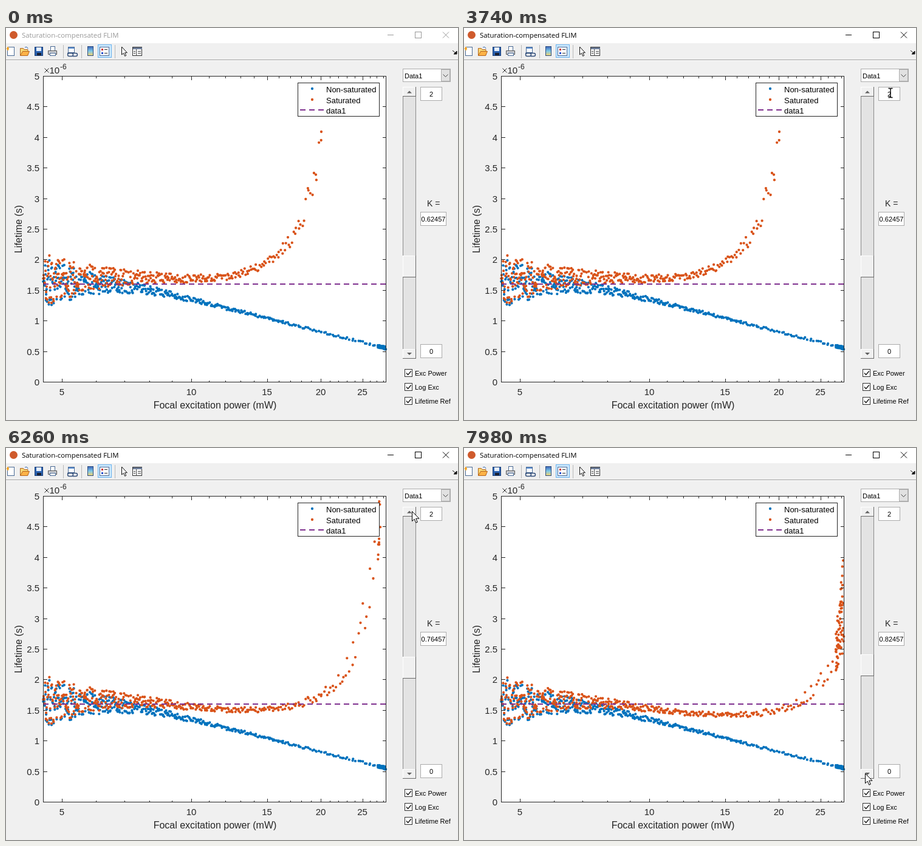
Write an HTML page that moves like this. It is 744 px wide and 646 px high and loops after 8000 ms.

```html
<!DOCTYPE html>
<html lang="en">
<head>
<meta charset="utf-8">
<title>Lifetime plot</title>
<style>
html, body { margin: 0; width: 100%; height: 100%; overflow: hidden; background: #f0f0f0; }
svg { display: block; width: 744px; height: 646px; font-family: "Liberation Sans", Arial, sans-serif; }
rect, line, .crisp { shape-rendering: crispEdges; }
text { white-space: pre; }
.ui { font-size: 11px; fill: #000; }
.axis { font-size: 15px; fill: #262626; }
.label { font-size: 16px; fill: #262626; }
.legend { font-size: 13px; fill: #000; }
.dots { fill: none; stroke-width: 4.3; stroke-linecap: round; }
.dash { stroke: #7e2f8e; stroke-width: 2; stroke-dasharray: 9 6; }
.mid { text-anchor: middle; }
.end { text-anchor: end; }
#halo { fill: #f4ea2e; fill-opacity: .8; mix-blend-mode: multiply; }
</style>
</head>
<body>
<svg id="stage" viewBox="0 0 744 646"></svg>
<script>
const BLUE = '#0072bd', ORANGE = '#d95319', INK = '#262626';
const PLOT = { left: 61.5, right: 625.5, top: 79.5, bottom: 583.5 };
const yOf = v => PLOT.bottom - 100.8 * v;

// Markup helpers
const box = (x, y, w, h, fill, stroke = 'none', extra = '') =>
  `<rect x="${x}" y="${y}" width="${w}" height="${h}" fill="${fill}" stroke="${stroke}" ${extra}/>`;
const path = (d, stroke = INK, fill = 'none', extra = '') =>
  `<path d="${d}" stroke="${stroke}" fill="${fill}" ${extra}/>`;
const crisp = (d, stroke) => path(d, stroke, 'none', 'class="crisp"');
const text = (x, y, s, cls = 'ui', extra = '') =>
  `<text x="${x}" y="${y}" class="${cls}" ${extra}>${s}</text>`;
const raised = (x, y, w, h) => box(x, y, w, h, '#f0f0f0') +
  crisp(`M${x + .5} ${y + h - 1}V${y + .5}H${x + w - 1}`, '#fff') +
  crisp(`M${x} ${y + h - .5}H${x + w - .5}V${y}`, '#696969');
const field = (x, y, w, s, id = '') => box(x + .5, y + .5, w - 1, 22, '#fff', '#ababab') +
  text(x + w / 2, y + 15.5, s, 'ui mid', id && `id="${id}"`);
const check = (y, s) => box(656.5, y + .5, 12, 12, '#fff', '#333') +
  path(`M659 ${y + 6.5}l2.7 3 5-6`, '#111', 'none', 'stroke-width="1.3"') + text(673, y + 11, s);

function randomFrom(seed) {
  return () => {
    seed = seed + 0x6d2b79f5 | 0;
    let r = Math.imul(seed ^ seed >>> 15, 1 | seed);
    r = r + Math.imul(r ^ r >>> 7, 61 | r) ^ r;
    return ((r ^ r >>> 14) >>> 0) / 4294967296;
  };
}

const range = (a, b, step) => Array.from({ length: Math.floor((b - a) / step) + 1 }, (_, i) => a + i * step);

// Model over the horizontal pixel position, which is logarithmic in power
const SPAN = 565, SWEEP = 415, PLATEAU = 70;
const endRise = x => Math.max(0, (x - 61) / SPAN) ** 30;
const meanLifetime = x => 1.62 - .0025 * 35 * Math.log1p(Math.exp((x - 199) / 35));
const saturation = x => Math.exp((x - 629) / 114 + .05 * endRise(x));
const sweepX = q => 61 - 300 * Math.log(1 - q * (1 - Math.exp(-SPAN / 300)));

const dataSets = [
  { name: 'Data1', seed: 11, shift: 0, spread: .42, decay: 90, xOf: p => 305 + 213 * Math.log2(p / 10),
    major: range(5, 25, 5), minor: range(5, 28, 1) },
  { name: 'Data2', seed: 29, shift: 16, spread: .52, decay: 68, xOf: p => 313 + 214 * Math.log2(p / 10),
    major: range(6, 26, 2), minor: range(4.5, 28, .5) }
];

for (const set of dataSets) {
  const random = randomFrom(set.seed);
  const noise = x => .015 + .01 * endRise(x) + set.spread * Math.exp((61 - x) / set.decay);
  set.samples = Array.from({ length: SWEEP + PLATEAU }, (_, i) => {
    const x = i < SWEEP ? sweepX((i + random()) / SWEEP) : 626 - 14 * random();
    return { x, v: meanLifetime(x) + noise(x) * (random() * 2 - 1) };
  });
  const tick = len => p => {
    const x = Math.round(set.xOf(p)) + .5;
    return x > 62 && x < 625 ? `M${x} ${PLOT.bottom}v${-len}M${x} ${PLOT.top}v${len}` : '';
  };
  set.ticks = set.minor.map(tick(3)).concat(set.major.map(tick(6))).join('');
  set.labels = set.major.map(p => text(set.xOf(p), 605, p, 'axis mid')).join('');
}

const dotPath = points => points.filter(p => p.v > 0 && p.v < 5.03)
  .map(p => `M${p.x.toFixed(1)} ${yOf(p.v).toFixed(1)}h0`).join('');
const compensated = (set, k) => set.samples.map(({ x, v }) =>
  ({ x, v: 1 / (1 / v - saturation(x - set.shift) / (k * k)) }));

// Static picture
const toolbar = () => {
  const sheet = (x, y, w, h) => box(x + .5, y + .5, w, h, '#fff', '#4a6a95');
  return [94.5, 124.5, 179.5].map(x => crisp(`M${x} 28V50`, '#b8b8b8')).join('') +
    sheet(2, 31, 11, 14) + path('M1 34h4M3 31v6', '#f0a020', 'none', 'stroke-width="2"') +
    path('M23.5 45V33.5h5l1.5 2h6V45Z', '#b5651d', '#f7d774') + path('M23.5 45.5l4-7h11l-3 7Z', '#b5651d', '#ffb347') +
    path('M31 32q4-2 5 2', '#2b62b0') +
    box(47.5, 31.5, 13, 14, '#2b62b0', '#1b3f78') + box(50, 32, 8, 6, '#e8f0fb') + box(51, 41, 7, 4, '#1c2333') +
    sheet(73, 30, 7, 7) + path('M69.5 37.5h14v6h-14Z', '#555', '#c9ccd2') + sheet(72, 41, 9, 4) +
    sheet(102, 31, 10, 9) + box(103, 32, 9, 2, '#5b8ed0') +
    path('M101 41.5h7a2.5 2.5 0 0 1 0 5h-4a2.5 2.5 0 0 1 0-5m5 0h6a2.5 2.5 0 0 1 0 5h-5', '#34507c', 'none', 'stroke-width="1.4"') +
    box(134.5, 30.5, 9, 15, 'url(#bar)', '#2c4d80') +
    box(151.5, 27.5, 22, 21, '#cce8ff', '#6cb4ee') + sheet(154, 31, 15, 14) +
    box(157, 34, 3, 3, '#d02020') + box(157, 40, 3, 3, '#2050d0') + crisp('M162 35.5h5M162 41.5h5', '#333') +
    path('M190.5 31v13l3-2.6 2.2 5 2-1-2.1-4.7h3.8Z', '#111', '#fff') +
    box(208.5, 31.5, 15, 14, '#fff', '#333') + box(209, 32, 15, 3, '#6c7c98') +
    crisp('M214.5 35v11M210 38.5h3M210 41.5h3M217 38.5h5M217 41.5h5', '#444') +
    path('M735 37l4 3.5M742 38v5h-5Z', '#111', '#111');
};

const yTicks = range(0, 5, .5);
const yTickMarks = yTicks.map(v => Math.round(yOf(v) - .5) + .5).map(y => `M61.5 ${y}h6M625.5 ${y}h-6`).join('');

document.getElementById('stage').innerHTML = `
<defs><linearGradient id="bar" x2="0" y2="1">
  <stop stop-color="#3a62b8"/><stop offset=".5" stop-color="#7ec8e8"/><stop offset="1" stop-color="#f6d36a"/>
</linearGradient></defs>
${box(0, 0, 744, 646, '#f0f0f0')}${box(0, 0, 744, 25, '#fff')}
<circle cx="12.5" cy="11.5" r="6.5" fill="#cf5a2c"/>
<g id="caption">${text(26, 16, 'Saturation-compensated FLIM', '', 'font-size="11.4" style="font-family:\'Open Sans\',sans-serif"')}
${crisp('M628 11.5h10M673.5 6.5h10v10h-10Z', 'currentColor')}${path('M719 6.5l10 10m0-10l-10 10', 'currentColor')}</g>
${toolbar()}
${crisp('M0 52.5H744', '#a0a0a0')}${crisp('M0 53.5H744', '#fff')}
${box(61, 79, 565, 505, '#fff')}
<path id="measured" class="dots" stroke="${BLUE}"/><path id="corrected" class="dots" stroke="${ORANGE}"/>
<line class="dash" x1="61" x2="626" y1="422" y2="422"/>
${crisp('M61.5 79.5H625.5V583.5H61.5Z' + yTickMarks, INK)}
<path id="ticks" class="crisp" stroke="${INK}"/><g id="labels"></g>
${yTicks.map(v => text(55, yOf(v) + 5.5, v, 'axis end')).join('')}
${path('M63.5 66.5l7 7m0-7l-7 7', INK)}${text(71.5, 75, '10', 'axis')}${text(89, 68, '-6', 'axis', 'style="font-size:12px"')}
${text(344, 627, 'Focal excitation power (mW)', 'label mid')}
${text(0, 0, 'Lifetime (s)', 'label mid', 'transform="translate(26 331.5) rotate(-90)"')}
${box(480.5, 90.5, 134, 55, '#fff', INK)}
<path class="dots" stroke="${BLUE}" d="M504 100h0"/><path class="dots" stroke="${ORANGE}" d="M504 118h0"/>
<line class="dash" x1="484" x2="524" y1="135" y2="135"/>
${['Non-saturated', 'Saturated', 'data1'].map((s, i) => text(527, 106 + 17.5 * i, s, 'legend')).join('')}
${box(653.5, 97.5, 21, 447, '#e3e3e3', '#8a8a8a')}
${raised(653, 97, 22, 16)}${path('M660 107.5h8l-4-4Z', 'none', '#606060')}
${raised(653, 529, 22, 16)}${path('M660 535h8l-4 4Z', 'none', '#606060')}
<g id="thumb">${raised(653, 0, 22, 36)}</g>
${field(682, 97, 36, '2')}${field(682, 521, 36, '0')}${field(682, 303, 43, '', 'kValue')}
${text(693, 294, 'K =', 'label', 'style="font-size:14px"')}
${['Exc Power', 'Log Exc', 'Lifetime Ref'].map((s, i) => check(562 + 23 * i, s)).join('')}
${box(653.5, 67.5, 78, 21, '#fff', '#adadad')}${text(656, 83, '', 'ui', 'id="choice"')}
${box(654.5, 68.5, 61, 19, 'none', '#222', 'id="focus" stroke-dasharray="1 1"')}
${box(716.5, 68.5, 14, 19, '#e1e1e1', '#adadad', 'id="drop"')}${path('M719.5 76.5l4 4 4-4', '#444')}
<g id="list">${box(653.5, 89.5, 78, 35, '#fff', '#444')}${box(654, 0, 77, 17, '#0078d7', 'none', 'id="hover"')}
${text(658, 103, 'Data1', 'ui', 'id="item0"')}${text(658, 120, 'Data2', 'ui', 'id="item1"')}</g>
<circle id="halo" r="14.5"/>
${path('M.5.5V16.6L4.2 13.2 6.8 19.2 9.3 18.1 6.7 12.2H12Z', '#000', '#fff', 'id="arrow"')}
${path('M-3.5-7.5H-1L0-6.5 1-7.5H3.5M-3.5 7.5H-1L0 6.5 1 7.5H3.5M0-6.5V6.5', '#000', 'none', 'id="beam" stroke-width="1.4"')}`;

const el = Object.fromEntries([...document.querySelectorAll('[id]')].map(e => [e.id, e]));
const show = (e, on) => e.setAttribute('visibility', on ? 'visible' : 'hidden');
const place = (e, x, y) => e.setAttribute('transform', `translate(${x.toFixed(1)} ${y.toFixed(1)})`);
const within = (t, a, b) => t >= a && t < b;

// Timeline
const LOOP = 8000, FRAME = 74, UPDATE_LAG = 130;
const moves = [ // start, end, x, y
  [150, 600, 682, 80], [900, 1180, 675, 116], [1620, 1770, 687, 86], [2380, 2500, 684, 100], [3330, 3670, 702, 107],
  [4000, 4280, 664, 105], [5800, 6080, 668, 104], [6800, 7320, 661, 563], [7400, 7540, 660, 536]];
const bursts = [[4400, 2, 240, 1], [5130, 2, 220, 1], [5800, 7, 140, 1], [7630, 2, 350, -1]];
const clicks = bursts.flatMap(([start, count, gap, dir]) =>
  Array.from({ length: count }, (_, i) => ({ at: start + i * gap, dir })));
const menuClicks = [[900, 980], [1450, 1600], [2120, 2200], [3070, 3140]];

const sliderAt = t => .62457 + clicks.reduce((sum, { at, dir }) => sum + (t >= at ? .02 * dir : 0), 0);

function pointerAt(t) {
  const held = Math.floor(t / FRAME) * FRAME;
  return moves.reduce(([x, y], [start, end, toX, toY]) => {
    const k = Math.min(1, Math.max(0, (held - start) / (end - start)));
    const ease = k * k * (3 - 2 * k);
    return [x + (toX - x) * ease, y + (toY - y) * ease];
  }, [744, 175]);
}

let drawn = '';
function drawPlot(set, k) {
  const key = set.name + k.toFixed(5);
  if (key === drawn) return;
  drawn = key;
  el.measured.setAttribute('d', dotPath(set.samples));
  el.corrected.setAttribute('d', dotPath(compensated(set, k)));
  el.ticks.setAttribute('d', set.ticks);
  el.labels.innerHTML = set.labels;
  el.kValue.textContent = k.toFixed(5);
}

function render(t) {
  drawPlot(dataSets[+within(t, 1680, 3220)], sliderAt(t - UPDATE_LAG));
  place(el.thumb, 0, Math.round(112 + 382 * (1 - sliderAt(t) / 2)));

  const caption = t < 900 ? '#999' : '#000';
  el.caption.setAttribute('fill', caption);
  el.caption.style.color = caption;

  el.choice.textContent = within(t, 1600, 3140) ? 'Data2' : 'Data1';
  show(el.focus, within(t, 980, 3670));
  const hot = within(t, 600, 1750) || within(t, 1980, 3290);
  el.drop.setAttribute('fill', hot ? '#cce4f7' : '#e1e1e1');
  el.drop.setAttribute('stroke', hot ? '#5a9bd0' : '#adadad');

  const open = within(t, 980, 1600) || within(t, 2200, 3140);
  const second = within(t, 1120, 2440);
  show(el.list, open);
  el.hover.setAttribute('y', second ? 107 : 90);
  el.item0.style.fill = second ? '#000' : '#fff';
  el.item1.style.fill = second ? '#fff' : '#000';

  const beam = within(t, 3600, 4060);
  show(el.beam, beam);
  show(el.arrow, !beam && t >= 150);
  show(el.halo, menuClicks.some(([a, b]) => within(t, a, b)) ||
    clicks.some(({ at }) => within(t, at + 60, at + UPDATE_LAG)));
  for (const mark of [el.beam, el.arrow, el.halo]) place(mark, ...pointerAt(t));
}

function tick() {
  render(performance.now() % LOOP);
  requestAnimationFrame(tick);
}
tick();
</script>
</body>
</html>
```
